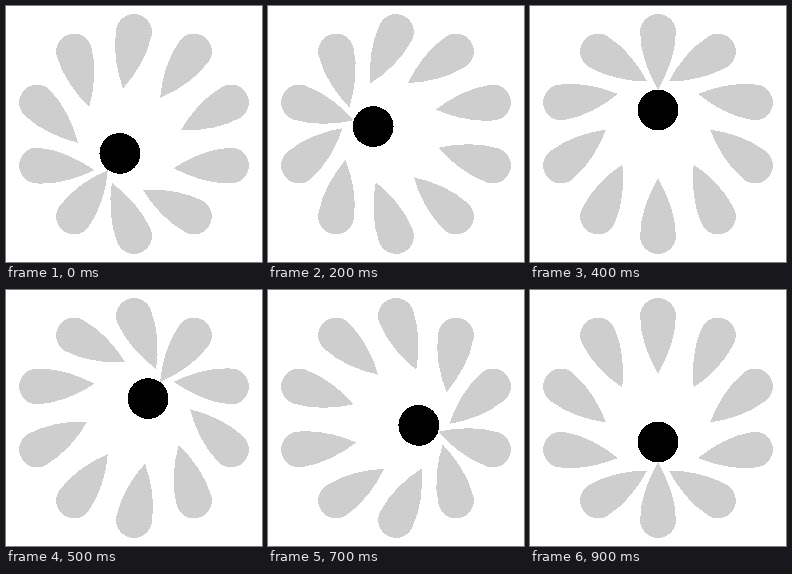
Recreate the animation shown at these times as an HTML page. Size 256x256 px, loop 1000 ms.

```html
<!DOCTYPE html>
<html lang="en">
<head>
<meta charset="utf-8">
<title>Petals following a dot</title>
<style>
  html, body { margin: 0; width: 100%; height: 100%; overflow: hidden; background: #fff; }
  svg { display: block; width: 100%; height: 100%; }
</style>
</head>
<body>
<svg id="stage" viewBox="0 0 256 256" shape-rendering="crispEdges">
  <g id="petals" fill="#cecece"></g>
  <circle id="dot" r="20.4"/>
</svg>
<script>
  const COUNT = 10, LOOP = 1000, CENTER = 128;
  const RING = 102, ORBIT = 24, AIM = 46;
  // Round bulb at the origin, tip along +x
  const PETAL = 'M0 -17.9A17.9 17.9 0 0 0 0 17.9C20 17.9 42 9.5 57.5 0C42 -9.5 20 -17.9 0 -17.9Z';

  const dot = document.getElementById('dot');
  const group = document.getElementById('petals');

  const polar = (degrees, radius) => {
    const a = degrees * Math.PI / 180;
    return { x: CENTER + radius * Math.cos(a), y: CENTER + radius * Math.sin(a) };
  };

  const petals = Array.from({ length: COUNT }, (_, i) => {
    const el = document.createElementNS('http://www.w3.org/2000/svg', 'path');
    el.setAttribute('d', PETAL);
    group.appendChild(el);
    return { el, ...polar(i * 360 / COUNT - 90, RING) };
  });

  function draw(time) {
    const step = Math.floor((time % LOOP) / LOOP * COUNT);
    const angle = 126 + step * 360 / COUNT;
    const pos = polar(angle, ORBIT);
    const aim = polar(angle, AIM);
    dot.setAttribute('cx', pos.x);
    dot.setAttribute('cy', pos.y);
    for (const { el, x, y } of petals) {
      const turn = Math.atan2(aim.y - y, aim.x - x) * 180 / Math.PI;
      el.setAttribute('transform', `translate(${x} ${y}) rotate(${turn})`);
    }
  }

  const start = performance.now();
  function tick() {
    draw(performance.now() - start);
    requestAnimationFrame(tick);
  }
  tick();
</script>
</body>
</html>
```
